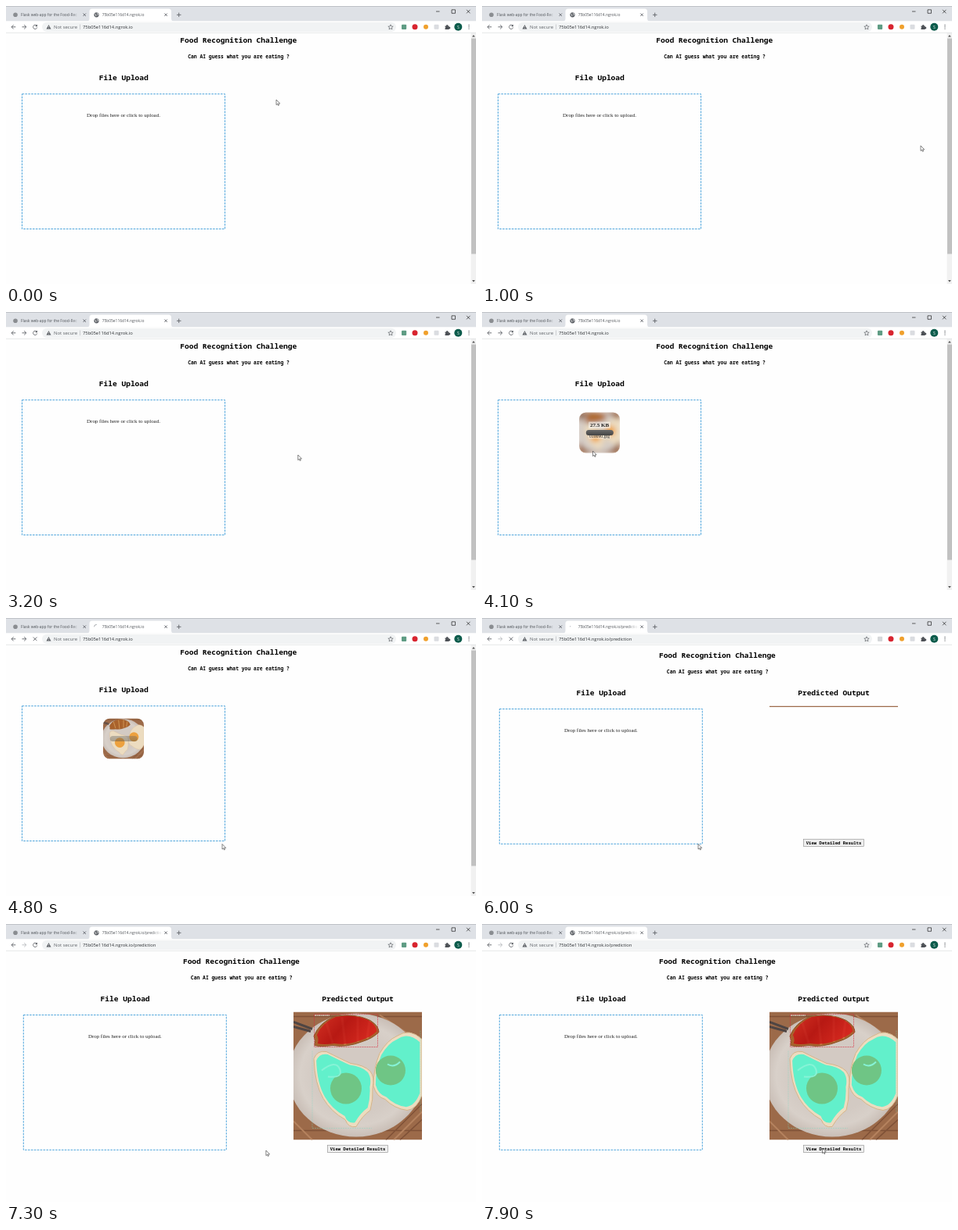
Animation, 600 px wide and 356 px high, one loop 8 s. Source, as an HTML page:

```html
<!DOCTYPE html>
<html lang="en">
<head>
<meta charset="utf-8">
<title>Food Recognition Challenge</title>
<style>
  html, body { margin: 0; width: 100%; height: 100%; overflow: hidden; background: #fff; }
  svg { display: block; width: 100vw; height: 100vh; }
  .ui { font-family: "Open Sans", sans-serif; }
  .mono { font: bold 9.55px "Noto Sans Mono", monospace; text-anchor: middle; }
  .sub { font-size: 6.37px; }
  .btn { font-size: 5.6px; }
  .serif { font-family: "Liberation Serif", serif; text-anchor: middle; }
  .line { fill: none; stroke: #5f6368; stroke-width: .9; }
</style>
</head>
<body>
<svg viewBox="0 0 600 356">
  <defs>
    <linearGradient id="fadeIdle" gradientUnits="userSpaceOnUse" x1="82" x2="97" y1="0" y2="0">
      <stop stop-color="#4d5156"/><stop offset="1" stop-color="#4d5156" stop-opacity="0"/>
    </linearGradient>
    <linearGradient id="fadeActive" gradientUnits="userSpaceOnUse" x1="186" x2="200" y1="0" y2="0">
      <stop stop-color="#4d5156"/><stop offset="1" stop-color="#4d5156" stop-opacity="0"/>
    </linearGradient>
    <linearGradient id="barFill" x2="0" y2="1">
      <stop stop-color="#6a6a6a"/><stop offset="1" stop-color="#444"/>
    </linearGradient>
    <radialGradient id="plateFill">
      <stop offset=".6" stop-color="#d3cac3"/><stop offset=".82" stop-color="#d8d0c9"/><stop offset="1" stop-color="#c9beb6"/>
    </radialGradient>
    <linearGradient id="redMask" x2="1" y2=".4">
      <stop stop-color="#d92a22"/><stop offset=".5" stop-color="#b90f10"/><stop offset="1" stop-color="#d81f1c"/>
    </linearGradient>
    <filter id="blur" x="-10%" y="-10%" width="120%" height="120%"><feGaussianBlur stdDeviation="9"/></filter>
    <clipPath id="thumbClip"><rect x="124" y="128.5" width="52" height="52" rx="8.7"/></clipPath>
    <clipPath id="photoClip"><rect id="photoRows" width="164" height="164"/></clipPath>

    <path id="roll" d="M26 31Q33 14 52 6Q78 1 98 11Q109 18 109 26Q101 34 88 38Q68 46 50 43Q34 45 27 43Q29 37 26 31Z"/>
    <path id="eggLeft" d="M26 60Q30 49 42 51Q60 60 73 66Q90 68 98 76Q104 84 101 97Q102 112 98 126Q88 133 80 147Q70 149 66 138Q48 128 38 111Q27 92 26 60Z"/>
    <path id="eggRight" d="M102 95Q102 72 110 53Q120 36 132 31Q148 20 164 35V107Q157 125 145 126Q129 124 117 112Q106 109 102 95Z"/>

    <!-- the plate of food, 164 x 164 -->
    <g id="meal">
      <rect width="164" height="164" fill="#9c6a49"/>
      <path d="M0 6H164M0 152H164M118 164L164 118M136 164L164 138" stroke="#7f5137" stroke-width="1.500"/>
      <path d="M110 4L164 40M0 140L24 164M128 164L164 128" stroke="#b5825e" stroke-width="2"/>
      <ellipse cx="80" cy="81" rx="87" ry="79" fill="url(#plateFill)"/>
      <path d="M0 13L24 22M0 19L22 25" stroke="#4f4543" stroke-width="3"/>
      <use href="#roll" fill="#a9622c" stroke="#8a5027"/>
      <path d="M42 14L50 40M62 7L66 42M82 6L82 38M97 12L94 34" stroke="#d09857" stroke-width="3"/>
      <g fill="#ecdcc0" stroke="#d5b48a">
        <use href="#eggLeft"/><use href="#eggRight"/>
      </g>
      <g fill="#eda13e"><circle cx="67" cy="98" r="20"/><circle cx="124" cy="75" r="19"/></g>
    </g>

    <!-- detected regions -->
    <g id="masks">
      <use href="#roll" fill="url(#redMask)" opacity=".88" transform="translate(6 1) scale(.92)"/>
      <g fill="#62f0cb">
        <use href="#eggLeft" transform="translate(5.500 8) scale(.91)"/>
        <use href="#eggRight" transform="translate(12 7) scale(.91)"/>
      </g>
      <g fill="#6fc585"><circle cx="67" cy="98" r="20"/><circle cx="124" cy="75" r="19"/></g>
      <path d="M36 75Q54 61 59 73T44 83M120 67Q128 72 136 64" fill="none" stroke="#86f3d6" stroke-width="2"/>
      <rect x="26.500" y="3" width="81" height="42" fill="none" stroke="#d8283c" stroke-width=".6" stroke-dasharray="2 1"/>
      <path d="M27 4.500H46" stroke="#eee" stroke-dasharray="2 .5"/>
      <path d="M24 50V149H100M162 24V128" fill="none" stroke="#79d9c0" stroke-width=".4" stroke-dasharray="2 1"/>
    </g>
  </defs>

  <rect width="600" height="356" fill="#fefefe"/>

  <!-- page -->
  <g id="heading">
    <text class="mono" x="296.700" y="47">Food Recognition Challenge</text>
    <text class="mono sub" x="297" y="67">Can AI guess what you are eating ?</text>
  </g>
  <g id="upload">
    <text class="mono" x="150.300" y="95">File Upload</text>
    <rect x="20.500" y="112.700" width="259" height="172.800" fill="none" stroke="#3a9bd8" stroke-width=".9" stroke-dasharray="2.600 1.300"/>
    <text id="prompt" class="serif" x="150" y="142" font-size="6.950" fill="#222">Drop files here or click to upload.</text>
    <g id="preview">
      <g clip-path="url(#thumbClip)">
        <use id="thumb" href="#meal"/>
      </g>
      <g id="details">
        <rect x="136" y="140.500" width="28" height="8.500" rx="1" fill="#fff" opacity=".45"/>
        <rect x="136" y="155.500" width="28" height="7" rx="1" fill="#fff" opacity=".4"/>
        <text class="serif" x="150" y="147.200" font-size="7" font-weight="bold" fill="#222">27.5 KB</text>
        <text class="serif" x="150" y="161" font-size="5.800" fill="#222">010090.jpg</text>
      </g>
      <rect id="progress" x="132.800" y="151" width="35" height="7" rx="3.500" fill="url(#barFill)"/>
    </g>
  </g>
  <g id="result">
    <text class="mono" x="449" y="98.700">Predicted Output</text>
    <g transform="translate(367 112.500)" clip-path="url(#photoClip)">
      <use href="#meal"/><use href="#masks"/>
    </g>
    <rect x="410.300" y="283.200" width="77" height="9.300" fill="#efefef" stroke="#8a8a8a" stroke-width=".6"/>
    <text class="mono btn" x="449" y="290">View Detailed Results</text>
  </g>
  <g id="scrollbar">
    <rect x="593.500" y="34" width="6.500" height="322" fill="#f1f1f1"/>
    <rect x="594" y="41.500" width="6" height="276" fill="#c1c1c1"/>
    <path d="M595 39.500L596.900 37L598.800 39.500ZM595 351L596.900 353.500L598.800 351Z" fill="#555"/>
  </g>

  <!-- browser frame -->
  <g class="ui">
    <rect width="600" height="19.500" fill="#dee1e6"/>
    <rect width="600" height=".7" fill="#b4b7bb"/>
    <path d="M103 19.500Q106.500 19.500 106.500 16V7Q106.500 3.500 110 3.500H207.500Q211 3.500 211 7V16Q211 19.500 214.500 19.500Z" fill="#fff"/>
    <rect y="19.500" width="600" height="14.500" fill="#fff"/>
    <path d="M0 34.300H600" stroke="#dcdee1" stroke-width=".7"/>
    <rect x="46" y="20.700" width="452" height="12.300" rx="6.150" fill="#f1f3f4"/>
    <circle cx="12" cy="11.300" r="2.800" fill="#8a8d91"/>
    <text x="19" y="13.200" font-size="4.900" fill="url(#fadeIdle)">Flask web-app for the Food-Rec</text>
    <text id="tabTitle" x="122.700" y="13.200" font-size="4.900" fill="url(#fadeActive)"></text>
    <g id="globe">
      <circle cx="115.500" cy="11.300" r="3.100" fill="#5f6368"/>
      <path d="M113.300 10L115 11.300L114.500 13M116 9L117.800 10.500L116.500 12" fill="none" stroke="#fff" stroke-width=".8"/>
    </g>
    <circle id="spinner" cx="115.500" cy="11.300" r="2.900" fill="none" stroke="#80868b" stroke-width=".7"/>
    <path class="line" d="M98.500 9.500L102 13M102 9.500L98.500 13M202.300 9.500L205.800 13M205.800 9.500L202.300 13M218 11.300H223.500M220.700 8.600V14"/>
    <path class="line" style="stroke:#222;stroke-width:.7" d="M549 7H553.500M569 4.800H573.500V9.300H569ZM588 4.800L592.500 9.300M592.500 4.800L588 9.300"/>
    <path class="line" d="M12.300 26.800H7M9.600 24.200L7 26.800L9.600 29.400"/>
    <path id="forward" class="line" d="M20.500 26.800H25.800M23.200 24.200L25.800 26.800L23.200 29.400"/>
    <g id="reload">
      <path class="line" d="M39 25A2.600 2.600 0 1 0 39.700 27.500"/>
      <path d="M40 23.500V26.300H37.200Z" fill="#5f6368"/>
    </g>
    <path id="stop" class="line" d="M34.800 24.500L39.400 29.100M39.400 24.500L34.800 29.100"/>
    <path d="M51.500 29.400L54.500 24L57.500 29.400Z" fill="#5f6368"/>
    <path d="M54.500 25.800V27.400M54.500 28.100V28.700" stroke="#fff" stroke-width=".6"/>
    <text x="61" y="29" font-size="5.950" fill="#5f6368">Not secure</text>
    <path d="M94.500 23.500V30" stroke="#b5b8bb" stroke-width=".6"/>
    <text id="address" x="98" y="29" font-size="5.800" fill="#2c2f33"></text>
    <path class="line" style="stroke-width:.7" d="M491 23.800L491.900 26L494.200 26.200L492.400 27.700L493 29.900L491 28.700L489 29.900L489.600 27.700L487.800 26.200L490.100 26Z"/>
    <rect id="guard" x="505" y="23.800" width="6.200" height="6.200" rx="1"/>
    <circle cx="522" cy="26.800" r="3.500" fill="#d8242f"/>
    <circle cx="536" cy="26.800" r="3" fill="#f0a02c"/>
    <rect x="546.500" y="23.800" width="6" height="6" rx="1" fill="#dadce0"/>
    <path d="M560.500 25.500H562A1.200 1.200 0 1 1 564.300 25.500H565.700V27A1.100 1.100 0 1 1 565.700 29V30H560.500V28.500A1 1 0 0 0 560.500 26.800Z" fill="#4d5156"/>
    <circle cx="577.300" cy="26.800" r="5" fill="#0d5c4c"/>
    <text x="577.300" y="28.700" font-size="5" fill="#fff" text-anchor="middle">S</text>
    <g fill="#5f6368"><circle cx="591" cy="24.500" r=".7"/><circle cx="591" cy="26.800" r=".7"/><circle cx="591" cy="29.100" r=".7"/></g>
  </g>

  <path id="cursor" d="M0 0V6.600L1.500 5.300L2.500 7.500L3.500 7L2.600 4.900H4.700Z" fill="#fff" stroke="#333" stroke-width=".6"/>
</svg>
<script>
  const LOOP = 8000, STEP = 100;
  const HOST = "75b05e116d14.ngrok.io";
  const DROP = 3700, LEAVE = 4500, NAVIGATE = 5200, PHOTO_READY = 6400, LOADED = 6500;

  // time, x, y of the pointer tip
  const pointerPath = [
    [0, 345, 120], [100, 345, 120], [200, 390, 126], [400, 390, 126], [1100, 570, 182],
    [1800, 570, 182], [2100, 561.5, 186.5], [2600, 561.5, 186.5], [2800, 604, 188],
    [2900, 604, 188], [3500, 141.5, 178], [4400, 141.5, 178], [4800, 276, 289.5],
    [6900, 276, 289.5], [7100, 296, 291], [7700, 434.5, 287], [LOOP, 434.5, 287]
  ];

  const $ = id => document.getElementById(id);
  const show = (id, visible) => $(id).style.display = visible ? "" : "none";
  const move = (id, x, y) => $(id).setAttribute("transform", `translate(${x} ${y})`);
  const clamp = v => Math.max(0, Math.min(1, v));
  const ease = v => v * v * (3 - 2 * v);

  function pointerAt(t) {
    const i = pointerPath.findIndex(p => p[0] > t);
    const [t0, x0, y0] = pointerPath[i - 1], [t1, x1, y1] = pointerPath[i];
    const k = ease((t - t0) / (t1 - t0));
    return [x0 + (x1 - x0) * k, y0 + (y1 - y0) * k];
  }

  function drawPage(t) {
    const predicted = t >= NAVIGATE, dropped = t >= DROP && !predicted, hovered = t < LEAVE + STEP;
    move("heading", predicted ? 3.7 : 0, predicted ? 3.8 : 0);
    move("upload", predicted ? 1.8 : 0, predicted ? 3.8 : 0);
    show("prompt", !dropped);
    show("preview", dropped);
    show("details", hovered);
    show("result", predicted);
    show("scrollbar", !predicted);

    const size = 52 / 164 * (hovered ? 1.05 : 1), half = 82 * size;
    $("thumb").setAttribute("transform", `translate(${150 - half} ${154.5 - half}) scale(${size})`);
    $("thumb").setAttribute("filter", hovered ? "url(#blur)" : "none");
    $("progress").setAttribute("width", 35 * clamp((t - DROP + STEP) / 300));
    $("progress").setAttribute("opacity", 1 - clamp((t - LEAVE) / 500));
    $("photoRows").setAttribute("height", t < PHOTO_READY ? 1.6 : 164);
  }

  function drawBrowser(t) {
    const predicted = t >= NAVIGATE, loading = t >= LEAVE + STEP && t < LOADED;
    const url = HOST + (predicted ? "/prediction" : "");
    $("tabTitle").textContent = $("address").textContent = url;
    show("globe", !loading);
    show("spinner", loading);
    show("reload", !loading);
    show("stop", loading);
    $("spinner").setAttribute("stroke-dasharray", predicted ? "1.2 30" : "5 30");
    $("spinner").setAttribute("transform", `rotate(${(t - 4800) * .3 + 180} 115.5 11.3)`);
    $("forward").style.stroke = predicted ? "#b8bbbf" : "";
    $("guard").setAttribute("fill", predicted && loading ? "#d5d7da" : "#5f9c84");
  }

  function frame(now) {
    const t = Math.floor(now % LOOP / STEP) * STEP;
    drawPage(t);
    drawBrowser(t);
    move("cursor", ...pointerAt(t));
    requestAnimationFrame(frame);
  }
  requestAnimationFrame(frame);
</script>
</body>
</html>
```
